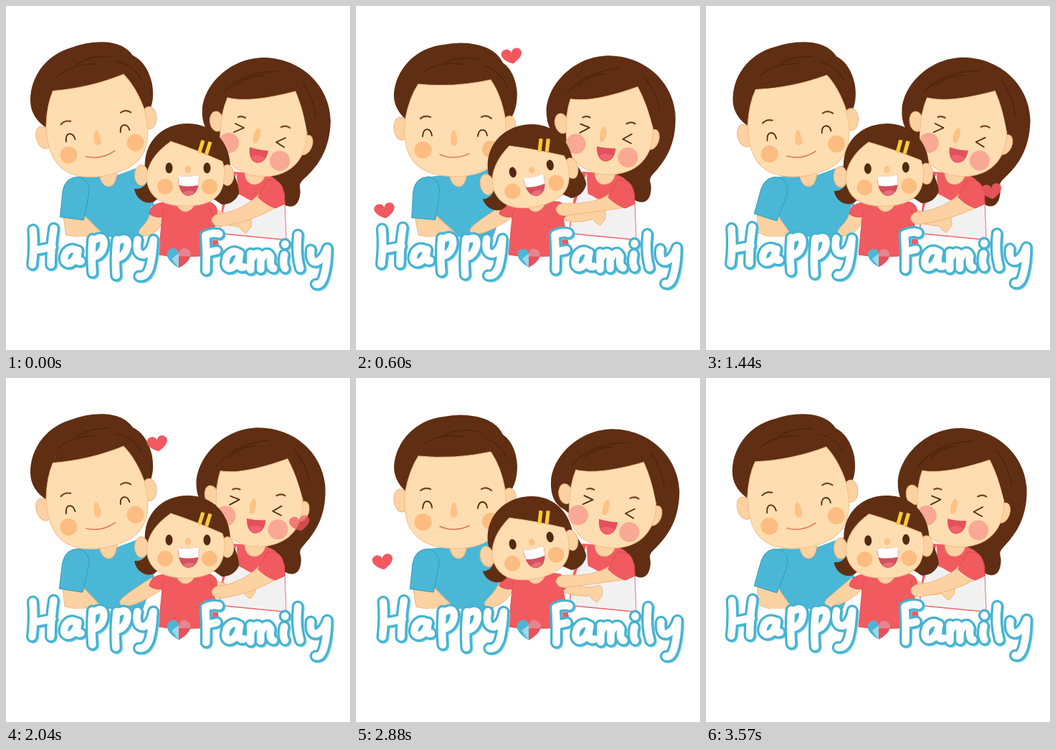
These frames come from a looping animation (480x480 px, 3.6 s). An HTML page:

```html
<!DOCTYPE html>
<html lang="en">
<head>
<meta charset="utf-8">
<title>Happy Family</title>
<style>
html, body { margin: 0; width: 100%; height: 100%; overflow: hidden; background: #fff; }
svg { display: block; width: 100vw; height: 100vh; }
path, ellipse, circle { stroke-linecap: round; stroke-linejoin: round; }
.hair { fill: #602e13; }
.skin { fill: #feddb1; stroke: #f5bd85; stroke-width: 1; }
.limb { fill: #fcd2a3; stroke: #f3b57c; stroke-width: 1; }
.red { fill: #f15b60; }
.blue { fill: #4ab7d6; }
.seam { stroke: #3795b3; stroke-width: .9; }
.redseam { stroke: #d9474d; stroke-width: .9; }
.ink { fill: none; stroke: #54290f; stroke-width: 1.8; }
.brow { fill: none; stroke: #7a3f1c; stroke-width: 2.2; }
.strand { fill: none; stroke: #43200c; stroke-width: 1; }
.nose { fill: #fdc284; }
.blush { fill: #fdbd80; }
.pink { fill: #f9a993; }
.letters path { fill: none; }
.drop { stroke: #7fd0e7; stroke-width: 16; }
.edge { stroke: #45b3d2; stroke-width: 17; }
.face { stroke: #fff; stroke-width: 10.5; }
</style>
</head>
<body>
<svg viewBox="0 0 480 480" role="img" aria-label="Happy Family">
  <defs>
    <clipPath id="above"><path d="M0 0H480V322H0Z"/></clipPath>
    <path id="heart" d="M0 11C-15 3-16-8-8-11C-3-12 0-8 0-5C1-9 4-12 8-11C16-8 15 3 0 11Z"/>
  </defs>

  <!-- mother -->
  <g id="mom">
    <path class="hair" d="M292 183C277 175 273 160 274 143C277 108 315 71 362 72C413 74 452 112 453 160C452 199 437 222 416 241C405 251 413 253 410 265C407 281 397 283 386 276L340 225Z"/>
  </g>
  <path class="red" d="M316 231Q302 258 297 318L391 327L389 262Q382 240 362 235Z"/>
  <path d="M322 232L324 262Q345 274 370 264L389 274L391 326L298 317Q300 284 316 247Z" fill="#f2f1f1" stroke="#ee6468" stroke-width=".8"/>
  <path class="red" d="M324 233L323 258Q340 277 361 272L384 250L362 234Z"/>
  <path class="limb" d="M333 232Q334 249 347 249Q359 248 362 234Z"/>
  <g id="momFace">
    <ellipse class="limb" cx="294" cy="161" rx="9.5" ry="14" transform="rotate(-8 294 161)"/>
    <ellipse class="limb" cx="418" cy="194" rx="9" ry="14.5" transform="rotate(24 418 194)"/>
    <path class="skin" d="M309 128Q340 136 404 119Q415 146 420 171C421 210 401 238 358 238C321 236 296 214 299 176Q300 149 309 128Z"/>
    <path class="hair" d="M303 139Q307 127 310 126Q345 134 404 118Q413 136 420 176Q431 155 425 132Q409 98 365 92Q315 99 303 139Z"/>
    <path class="strand" d="M304 121Q331 91 381 91M321 111Q338 97 360 97M414 106Q429 127 432 154"/>
    <path class="brow" d="M324 155Q329 153 334 156M384 169Q391 166 396 170"/>
    <path class="ink" d="M320 164L332 170L318 176M390 184L377 190L388 197"/>
    <ellipse class="nose" cx="350" cy="181" rx="4.5" ry="11" transform="rotate(16 350 181)"/>
    <circle class="pink" cx="311" cy="191" r="14"/>
    <circle class="pink" cx="382" cy="216" r="14"/>
    <path d="M340 197Q352 201 366 202Q363 219 350 219Q338 216 340 197Z" fill="#e4505b"/>
    <path d="M342 210Q351 205 361 212Q356 219 350 218Q344 216 342 210Z" fill="#f1646c"/>
  </g>

  <!-- father -->
  <g clip-path="url(#above)">
    <path class="blue" d="M92 241Q112 235 130 237L155 236Q174 229 193 222L207 278L190 326H111Q97 280 92 241Z"/>
    <path class="limb" d="M130 232Q132 252 144 252Q153 251 155 233Z"/>
    <g id="dadArm">
      <path class="limb" d="M83 292L113 292L143 318L141 326L89 320Z"/>
      <path class="blue seam" d="M102 238Q82 239 80 260L79 296L112 298Q115 280 117 255Q115 242 102 238Z"/>
    </g>
  </g>
  <g id="dadHead">
    <path class="hair" d="M69 158Q53 143 53 124C55 88 84 58 122 54Q146 49 169 54Q196 60 205 79Q223 92 225 122Q225 147 214 160Z"/>
    <ellipse class="limb" cx="63" cy="171" rx="10" ry="16" transform="rotate(-8 63 171)"/>
    <ellipse class="limb" cx="213" cy="169" rx="10" ry="15.5" transform="rotate(8 213 169)"/>
    <path class="skin" d="M87 109Q138 114 188 103Q202 123 208 155C214 212 191 238 137 238C86 237 62 212 69 157Q75 127 87 109Z"/>
    <path class="strand" d="M96 91Q118 76 151 82M125 79Q145 69 173 75M181 84Q203 91 211 114"/>
    <path class="brow" d="M90 157Q96 152 104 155M175 155Q182 151 189 157"/>
    <path class="ink" d="M93 182Q94 172 99 172Q105 172 106 181M170 182Q171 173 176.500 173Q182 173 183 181"/>
    <path class="nose" d="M137 173Q139 173 141 184Q143 194 137 195Q130 194 132 184Q134 173 137 173Z"/>
    <circle class="blush" cx="93.500" cy="201" r="12"/>
    <circle class="blush" cx="188" cy="200" r="12"/>
    <path d="M117 207Q137 216 158 206" fill="none" stroke="#e2705a" stroke-width="1.400"/>
  </g>

  <!-- daughter -->
  <path id="girlArm" class="limb"/>
  <path id="girlHand" class="limb"/>
  <path class="red redseam" d="M221 274Q202 275 200 290Q208 296 218 294L213 347Q240 352 299 347L289 296Q297 292 293 280Q287 271 272 273Z"/>
  <path d="M218 293L221 283M289 294L285 282" class="redseam" fill="none"/>
  <path class="limb" d="M235 270Q240 287 251 287Q262 285 266 270Z"/>
  <g id="girlHead">
    <path class="hair" d="M194 228C191 190 218 164 253 164C288 164 312 188 313 224Q326 250 325 262Q318 277 301 277L291 270H210Q205 276 195 274Q182 270 179 255Q190 257 197 246Z"/>
    <ellipse class="limb" cx="189" cy="236" rx="9.500" ry="14.500"/>
    <ellipse class="limb" cx="309" cy="236" rx="9" ry="14.500"/>
    <path class="skin" d="M230 189Q264 200 302 217Q307 231 304 243C301 270 280 279 250 279C219 279 198 268 196 239Q199 210 230 189Z"/>
    <path d="M275 187.500L269.500 205M285 189.500L279.500 207" stroke="#f9cb38" stroke-width="5.200" style="stroke-linecap:butt"/>
    <ellipse cx="227.500" cy="226" rx="5" ry="7.400" fill="#54290f"/>
    <ellipse cx="280.500" cy="226" rx="5" ry="7.400" fill="#54290f"/>
    <ellipse class="nose" cx="254" cy="228" rx="4" ry="5"/>
    <circle class="blush" cx="222" cy="252" r="11"/>
    <circle class="blush" cx="284" cy="252" r="11"/>
    <path d="M240 237Q255 239 269 236Q271 264 254 265Q240 263 240 237Z" fill="#d4505e"/>
    <path d="M240 237Q255 239 269 236L268.500 250Q253 253 241.500 250Z" fill="#fff"/>
    <path d="M246 261Q254 255 263 259Q260 265 254 264Q249 264 246 261Z" fill="#e5707a"/>
  </g>
  <path id="momArm" class="limb"/>
  <path class="red redseam" d="M365 243Q383 240 387 257L389 276L376 282Q363 278 352 267Z"/>

  <!-- lettering -->
  <g id="happy" class="letters"></g>
  <g id="family" class="letters"></g>
  <g id="badge">
    <path d="M0 13C-17 3-19-8-10-12C-4-14-1-10 0-6Z" fill="#4db6d4"/>
    <path d="M0 13C17 3 19-8 10-12C4-14 1-10 0-6Z" fill="#e5868f"/>
    <path d="M0 13L-9 1L0-6Z" fill="#9bd7e7"/>
    <path d="M0 13L0-2L15-2Q13 6 0 13Z" fill="#e9505a"/>
  </g>
  <g id="hearts" fill="#f1595f"></g>
</svg>
<script>
const $ = id => document.getElementById(id);
const set = (id, name, value) => $(id).setAttribute(name, value);
const LOOP = 3600, STEP = 30, TAU = 2 * Math.PI;
const clamp = v => Math.max(0, Math.min(1, v));
const ease = v => (1 - Math.cos(Math.PI * clamp(v))) / 2;
const wave = (t, period, peak = 0) => (1 + Math.cos(TAU * (t - peak) / period)) / 2;
const mix = (a, b, k) => a + (b - a) * k;
const fix = v => v.toFixed(2);

const words = {
  happy: [
    'M37 312Q39 337 36 361M66 310Q62 335 62 361M38 341Q50 339 64 336',
    'M99 342Q90 335 83 344Q77 356 85 359Q95 360 100 341Q96 359 104 356',
    'M120 325Q118 350 120 372M120 328Q136 317 136 332Q134 348 120 350',
    'M154 326Q151 352 153 376M154 329Q170 319 169 334Q166 350 153 352',
    'M183 326Q179 348 192 347Q202 343 205 326Q204 349 200 364Q195 379 185 377'
  ],
  family: [
    'M278 320Q280 345 279 369M278 320Q289 315 297 318M280 344L294 341',
    'M325 345Q316 338 308 349Q303 364 311 366Q322 365 326 345Q321 368 332 364',
    'M341 345L341 368M342 353Q350 339 355 349L355 367M356 353Q364 339 369 350Q367 365 373 366',
    'M388 347Q385 360 389 366M389 332L389 332.500',
    'M407 319Q404 346 410 366',
    'M425 340Q423 358 433 357Q443 353 448 338Q448 359 444 374Q440 390 432 388'
  ]
};
for (const id in words) {
  const layer = (name, move = '') => `<g transform="translate(${move || 0})">` +
    words[id].map(d => `<path class="${name}" d="${d}"/>`).join('') + '</g>';
  $(id).innerHTML = layer('drop', '1.5 1.5') + layer('edge') + layer('face');
}

// Each flight: start, duration, path and opacity of one rising heart.
const flights = [
  { start: 110, span: 940, x: q => 205 + 24 * q, y: q => 116 - 88 * q },
  { start: 1760, span: 990, x: q => 202 + 33 * q, y: q => 117 - 89 * q },
  { start: 405, span: 1020, x: q => 40 + 4 * Math.cos(q * TAU * 1.3), y: q => 305 - 100 * q },
  { start: 2380, span: 1020, x: q => 40 + 4 * Math.cos(q * TAU * 1.3), y: q => 306 - 100 * q },
  { start: 1290, span: 870, x: q => 396 + 16 * q, y: q => 273 - 81 * q, alpha: .9 }
];
$('hearts').innerHTML = flights.map((f, i) => `<use id="heart${i}" href="#heart"/>`).join('');

function drawHeart(f, i, t) {
  const q = (t - f.start) / f.span;
  const size = mix(.25, 1, ease(q * 6));
  const alpha = q < 0 || q > 1 ? 0 : (f.alpha || 1) * clamp((1 - q) * 6);
  const c = clamp(q);
  set('heart' + i, 'opacity', fix(alpha));
  set('heart' + i, 'transform',
    `translate(${fix(f.x(c))} ${fix(f.y(c))}) rotate(-9) scale(${fix(size * 1.1)} ${fix(size * .95)})`);
}

// Father and daughter: quick rise, rest, slower fall.
function nod(t) {
  const p = t % 2100;
  return p < 780 ? ease(p / 640) : 1 - ease((p - 780) / 920);
}

function draw(t) {
  const k = nod(t), m = 1 - wave(t, 1335);
  const arm = 1 - wave(t, 2110, 380);
  const momTurn = `rotate(${fix(-5 * m)} 325 243)`;
  set('mom', 'transform', momTurn);
  set('momFace', 'transform', momTurn);
  set('dadHead', 'transform', `rotate(${fix(-9.8 * (1 - k))} 131 239)`);
  set('dadArm', 'transform', `rotate(${fix(14 * arm)} 98 245)`);
  set('girlHead', 'transform', `translate(${fix(-1.5 * k)} 0) rotate(${fix(-11 * k)} 255 267)`);

  const hx = mix(188, 161, m), hy = mix(316, 314, m);
  set('girlArm', 'd', `M203 279Q${fix(hx + 14)} ${fix(hy - 18)} ${fix(hx)} ${fix(hy - 6)}` +
    `Q${fix(hx - 7)} ${fix(hy + 3)} ${fix(hx + 6)} ${fix(hy + 5)}Q${fix(hx + 30)} ${fix(hy)} 219 294Z`);

  const gx = mix(335, 341, m), gy = mix(304, 295, m) - 2 * k;
  set('girlHand', 'd', `M285 278Q305 292 ${fix(gx - 10)} ${fix(gy - 8)}` +
    `L${fix(gx + 4)} ${fix(gy - 11)}Q${fix(gx + 9)} ${fix(gy - 6)} ${fix(gx + 7)} ${fix(gy + 4)}` +
    `L${fix(gx)} ${fix(gy + 13)}Q${fix(gx - 7)} ${fix(gy + 10)} ${fix(gx - 10)} ${fix(gy + 4)}Q302 306 284 296Z`);

  const mx = mix(288, 280, k), my = mix(298, 283, k);
  set('momArm', 'd', `M353 263L377 281Q342 ${fix(my + 3)} ${fix(mx + 15)} ${fix(my + 9)}` +
    `Q${fix(mx)} ${fix(my + 11)} ${fix(mx - 1)} ${fix(my)}Q${fix(mx + 2)} ${fix(my - 9)} ${fix(mx + 14)} ${fix(my - 8)}` +
    `Q333 ${fix(mix(283, 277, k))} 353 263Z`);

  const sway = Math.cos(TAU * (t - 900) / 1000);
  set('happy', 'transform', `translate(${fix(1.2 * sway - .3)} ${fix(sway - .7)})`);
  set('family', 'transform', `translate(${fix(.7 * sway - .2)} ${fix(.8 * sway - .5)})`);
  set('badge', 'transform', `translate(241 351.500) scale(${fix(1.04 + .05 * sway)})`);
  flights.forEach((f, i) => drawHeart(f, i, t));
}

const begin = performance.now();
function tick(now) {
  const t = Math.max(0, now - begin) % LOOP;
  draw(Math.floor(t / STEP) * STEP);
  requestAnimationFrame(tick);
}
draw(0);
requestAnimationFrame(tick);
</script>
</body>
</html>
```
